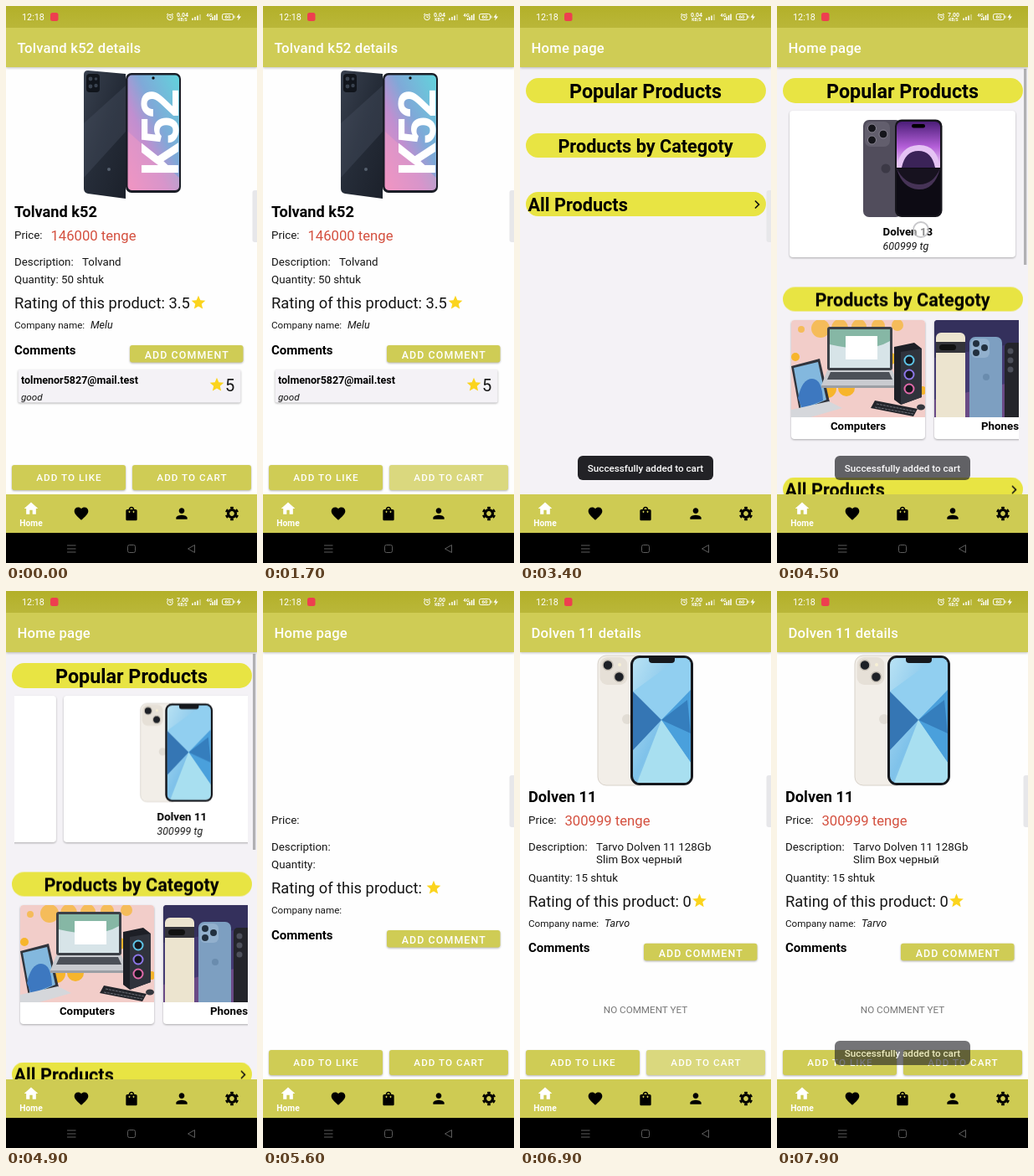
Recreate the animation shown at these times as an HTML page. Size 300 px wide and 665 px high, loop 8 s.

```html
<!DOCTYPE html>
<html lang="en">
<head>
<meta charset="utf-8">
<title>Shop app</title>
<style>
html, body { margin: 0; width: 100%; height: 100%; overflow: hidden; background: #fff; }
svg { display: block; width: 100%; height: 100%; }
text { font-family: Roboto, "Noto Sans", sans-serif; font-size: 13.33px; fill: #161616; white-space: pre; }
.title { font-size: 16.67px; font-weight: 500; letter-spacing: .2px; fill: #fff; }
.name { font-size: 18.2px; font-weight: 700; fill: #000; }
.cost { font-size: 16.67px; fill: #d4503f; }
.rate { font-size: 18.33px; }
.small { font-size: 11.67px; }
.ital { font-size: 12.5px; font-style: italic; }
.head { font-size: 15px; font-weight: 700; fill: #000; }
.btn { font-size: 11.67px; font-weight: 500; letter-spacing: 1.04px; fill: #fff; text-anchor: middle; }
.wide { font-size: 12.4px; letter-spacing: 1.1px; }
.bold { font-weight: 700; fill: #000; }
.pill { font-size: 21.67px; font-weight: 700; fill: #000; }
.mid { text-anchor: middle; }
.raised { filter: drop-shadow(0 1px 1px rgba(0,0,0,.3)); }
.tiny { font-size: 6px; font-weight: 700; fill: #fff; text-anchor: middle; }
</style>
</head>
<body>
<svg viewBox="0 0 300 665" preserveAspectRatio="none">
<defs>
  <linearGradient id="bar" x2="0" y2="1"><stop stop-color="#b3b029"/><stop offset="1" stop-color="#bab739"/></linearGradient>
  <linearGradient id="dark" x2="1" y2="1"><stop stop-color="#38404e"/><stop offset=".5" stop-color="#252c38"/><stop offset="1" stop-color="#1c212b"/></linearGradient>
  <linearGradient id="candy" x1="1" y1="0" x2="0" y2="1"><stop stop-color="#62d3dc"/><stop offset=".4" stop-color="#7fa9d8"/><stop offset=".62" stop-color="#c08fd0"/><stop offset="1" stop-color="#ef8fc0"/></linearGradient>
  <linearGradient id="sky" x2="1" y2="1"><stop stop-color="#b9e2f4"/><stop offset=".5" stop-color="#7fc2ea"/><stop offset="1" stop-color="#c9ecf0"/></linearGradient>
  <linearGradient id="dusk" x2="0" y2="1"><stop stop-color="#4b1e78"/><stop offset=".55" stop-color="#b45fd8"/><stop offset="1" stop-color="#f1d9f8"/></linearGradient>
  <clipPath id="body"><rect y="73" width="300" height="510"/></clipPath>
  <clipPath id="strip"><rect x="10" y="120" width="279" height="420"/></clipPath>
  <clipPath id="pic1"><path d="M17 491V379q0-4 4-4H173q4 0 4 4V491z"/></clipPath>
  <clipPath id="pic2"><path d="M188 491V379q0-4 4-4H344q4 0 4 4V491z"/></clipPath>
  <clipPath id="lightScreen"><rect x="135" y="80" width="69" height="149" rx="8"/></clipPath>
  <clipPath id="duskScreen"><rect x="143" y="138" width="52" height="112" rx="6"/></clipPath>
  <path id="star" fill="#fbd41d" d="M12 17.27L18.18 21l-1.64-7.03L22 9.24l-7.19-.61L12 2 9.19 8.63 2 9.24l5.46 4.73L5.82 21z"/>

  <g id="darkPhone">
    <path d="M98 77L143 81V230L98 224Q93 223 93 218V82Q93 77 98 77z" fill="url(#dark)"/>
    <path d="M93 140L143 95V150L93 205z" fill="#4a5566" opacity=".35"/>
    <rect x="96" y="81" width="16" height="22" rx="4" fill="#11151c"/>
    <g fill="#39424f"><circle cx="101" cy="87" r="2.4"/><circle cx="101" cy="96" r="2.4"/><circle cx="107.500" cy="87" r="1.800"/><circle cx="107.500" cy="95" r="2.200"/></g>
    <circle cx="123" cy="195" r="2" fill="#56606e"/>
    <rect x="143" y="80" width="66" height="143" rx="7" fill="#1a1d26"/>
    <rect x="145.500" y="82.500" width="61.500" height="137.500" rx="5" fill="url(#candy)"/>
    <path d="M146 150L207 205V215q0 5-5 5H151q-5 0-5-5z" fill="#f49cc4" opacity=".45"/>
    <circle cx="176" cy="86" r="1.700" fill="#111"/>
    <text transform="translate(206 203) rotate(-90)" style="font-size:62px;font-weight:700;fill:#fff;letter-spacing:-3px">K52</text>
  </g>

  <g id="lightPhone">
    <rect x="93" y="77" width="60" height="155" rx="10" fill="#f2eee8" stroke="#d8d2ca"/>
    <rect x="95.500" y="79" width="33" height="33" rx="9" fill="#e6e0d7"/>
    <g fill="#1d2026" stroke="#c5beb4" stroke-width="1.500"><circle cx="105" cy="88.500" r="6"/><circle cx="118.500" cy="102.500" r="6"/></g>
    <circle cx="119" cy="88" r="2" fill="#f8f0d5"/>
    <circle cx="128" cy="153" r="6" fill="#e2ddd5"/>
    <rect x="132" y="77" width="75" height="155" rx="11" fill="#16181d"/>
    <g clip-path="url(#lightScreen)">
      <rect x="135" y="80" width="69" height="149" fill="url(#sky)"/>
      <path d="M135 120L169 154 204 120V80H190z" fill="#91cff0"/>
      <path d="M135 120L169 154 135 190z" fill="#3576b4"/>
      <path d="M169 154L204 118V205z" fill="#4aa0dc"/>
      <path d="M169 154L204 205V229H140z" fill="#a8dff0"/>
      <path d="M169 154L200 130 204 170z" fill="#2968a8" opacity=".6"/>
    </g>
    <path d="M154 79H185V82q0 4-4 4H158q-4 0-4-4z" fill="#16181d"/>
  </g>

  <g id="duskPhone">
    <rect x="103" y="136" width="46" height="116" rx="7" fill="#514d5c"/>
    <rect x="105" y="138" width="30" height="30" rx="7" fill="#625e6d"/>
    <g fill="#15151b" stroke="#8a8694"><circle cx="113.500" cy="146" r="5"/><circle cx="113.500" cy="160" r="5"/><circle cx="127" cy="153" r="5"/></g>
    <circle cx="130" cy="194" r="5.500" fill="#3c3946"/>
    <rect x="141" y="135.500" width="56.500" height="116.500" rx="8" fill="#15141b"/>
    <g clip-path="url(#duskScreen)">
      <rect x="143" y="138" width="52" height="112" fill="#0d0b14"/>
      <path d="M143 138H195V193H143z" fill="url(#dusk)"/>
      <path d="M143 193Q147 167 169 166T195 193z" fill="#e5c3f4"/>
      <path d="M149 193Q153 173 169 173T189 193z" fill="#3b2358"/>
      <path d="M143 194Q150 218 169 219T195 194z" fill="#463356"/>
      <path d="M143 194Q152 212 169 213T195 194z" fill="#17121f"/>
    </g>
    <rect x="161" y="141" width="16" height="4.500" rx="2.200" fill="#000"/>
  </g>
</defs>

<g id="first"></g>

<g id="home" clip-path="url(#body)">
  <rect y="73" width="300" height="510" fill="#f4f2f6"/>
  <rect x="7" y="86" width="287" height="30" rx="15" fill="#e8e443"/>
  <text x="150" y="110" class="pill mid" style="font-size:23.33px">Popular Products</text>
  <g id="lists" clip-path="url(#strip)">
    <g id="slides">
      <g class="slide"></g>
      <g class="slide" transform="translate(279)"></g>
    </g>
    <g class="raised">
      <rect x="17" y="375" width="160" height="142" rx="4" fill="#fff"/>
      <rect x="188" y="375" width="160" height="142" rx="4" fill="#fff"/>
    </g>
    <g id="pictures">
      <g clip-path="url(#pic1)">
        <rect x="17" y="375" width="160" height="116" fill="#f2cdc9"/>
        <g id="dots" fill="#f7b52c"></g>
        <path d="M17 430L51 421 63 473 28 489z" fill="#30343c"/>
        <path d="M20 432L49 425 59 470 29 483z" fill="#83b8de"/>
        <path d="M25 468Q30 445 42 445T55 471L30 481z" fill="#3d78c0"/>
        <path d="M17 482L62 472 78 480 40 491H17z" fill="#d5d7db"/>
        <rect x="60" y="383" width="78" height="52" rx="3" fill="#3c4047"/>
        <rect x="63" y="386" width="72" height="46" fill="#d7e4e8"/>
        <path d="M63 386H135V400Q110 415 63 404z" fill="#86b7a5"/>
        <rect x="82" y="394" width="38" height="28" fill="#fff"/>
        <path d="M60 435H138L145 453H53z" fill="#c9cbd0"/>
        <path d="M64 437H134L138 446H60z" fill="#4c5058"/>
        <path d="M53 453H145V456H53z" fill="#9c9fa5"/>
        <path d="M140 407L164 402 173 409V467L148 476 140 470z" fill="#1d1f26"/>
        <path d="M148 413L173 409V467L148 476z" fill="#30333c"/>
        <g fill="#15161c" stroke-width="2"><circle cx="158" cy="423" r="5.500" stroke="#5dc5e8"/><circle cx="158" cy="440" r="5.500" stroke="#8d76e8"/><circle cx="158" cy="457" r="5.500" stroke="#e069a9"/></g>
        <path d="M117 471L168 481 163 490 112 480z" fill="#23252b"/>
        <path d="M119 475L165 484M117 479L163 487" stroke="#6d7078" stroke-dasharray="3 1"/>
        <ellipse cx="172" cy="479" rx="5" ry="3.500" fill="#34373e"/>
      </g>
      <g clip-path="url(#pic2)">
        <rect x="188" y="375" width="160" height="116" fill="#443a72"/>
        <path d="M188 375H300V400L188 420z" fill="#34305c"/>
        <path d="M188 470L300 445V491H188z" fill="#6a4a86"/>
        <rect x="190" y="390" width="35" height="110" rx="6" fill="#ece4cf"/>
        <rect x="190" y="401" width="35" height="13" fill="#34343a"/>
        <rect x="194" y="404" width="20" height="7" rx="3.500" fill="#111"/>
        <rect x="230" y="395" width="39" height="105" rx="7" fill="#7d9fc1"/>
        <rect x="232" y="397" width="22" height="23" rx="6" fill="#92b0cd"/>
        <g fill="#22303f"><circle cx="238" cy="403" r="4"/><circle cx="238" cy="414" r="4"/><circle cx="248" cy="408" r="4"/></g>
        <circle cx="250" cy="443" r="4" fill="#6a8cae"/>
        <rect x="272" y="402" width="36" height="100" rx="5" fill="#24252b"/>
        <g fill="#4d505b"><circle cx="279" cy="412" r="3.500"/><circle cx="279" cy="423" r="3.500"/><circle cx="279" cy="434" r="3.500"/></g>
      </g>
    </g>
    <text x="97" y="506" class="bold mid">Computers</text>
    <text x="244" y="506" class="bold">Phones</text>
  </g>
  <g id="category">
    <rect x="7" y="152" width="287" height="29" rx="14.500" fill="#e8e443"/>
    <text x="150" y="174.500" class="pill mid">Products by Categoty</text>
  </g>
  <g id="all">
    <rect x="7" y="222" width="287" height="29" rx="14.500" fill="#e8e443"/>
    <text x="9.500" y="245" class="pill">All Products</text>
    <path d="M281 232.500L285.500 237 281 241.500" fill="none" stroke="#111" stroke-width="1.700"/>
  </g>
</g>

<g id="second"></g>

<rect id="handle" x="294.500" y="220" width="8" height="62" rx="3" fill="#e7e7ea"/>
<rect id="scroll" x="295" y="75" width="3.300" height="234" fill="#b1b0b3"/>

<g>
  <rect y="26" width="300" height="47" fill="#cfcc55" style="filter:drop-shadow(0 1px 1.500px rgba(0,0,0,.25))"/>
  <rect width="300" height="26" fill="url(#bar)"/>
  <text class="title" id="t1" x="13.500" y="56">Tolvand k52 details</text>
  <text class="title" id="t2" x="13.500" y="56">Home page</text>
  <text class="title" id="t3" x="13.500" y="56">Dolven 11 details</text>
  <text x="19" y="17" style="font-size:10.8px;fill:#fff">12:18</text>
  <rect x="53" y="8" width="9.500" height="10" rx="2.500" fill="#ee3f4f"/>
  <g fill="none" stroke="#fff">
    <circle cx="196" cy="13.500" r="3.300"/><path d="M196 11.500V13.700H197.500M192 10.500L194 9M200 10.500L198 9"/>
    <rect x="258.500" y="9.500" width="13" height="7" rx="2"/><path d="M273 11.500V14.500"/>
  </g>
  <text class="tiny" id="slow" x="211" y="12.500" style="font-size:7px">0.04</text>
  <text class="tiny" id="fast" x="211" y="12.500" style="font-size:7px">7.00</text>
  <text class="tiny" x="211" y="18" style="font-size:5px">KB/S</text>
  <path d="M223 17V14.500M226 17V13M229 17V11.500M244.500 17V14.500M247 17V13M249.500 17V11M252 17V9.500" stroke="#fff" stroke-width="1.500"/>
  <path d="M232 17V10" stroke="#fff" stroke-opacity=".45" stroke-width="1.500"/>
  <text class="tiny" x="243" y="13">4G</text>
  <text class="tiny" x="265" y="15.200">60</text>
  <path d="M279 9L275.500 13.700H278L277 17.500 281 12.500H278.400z" fill="#fff"/>
</g>

<g>
  <rect y="583" width="300" height="46" fill="#cecb53"/>
  <path transform="translate(20 590) scale(.833)" fill="#fff" d="M10 20v-6h4v6h5v-8h3L12 3 2 12h3v8z"/>
  <text x="30" y="621" class="mid" style="font-size:10.2px;font-weight:700;fill:#fff">Home</text>
  <path transform="translate(80 596) scale(.833)" d="M12 21.35l-1.45-1.32C5.4 15.36 2 12.28 2 8.5 2 5.42 4.42 3 7.5 3c1.74 0 3.41.81 4.5 2.09C13.09 3.81 14.76 3 16.5 3 19.58 3 22 5.42 22 8.5c0 3.78-3.4 6.86-8.55 11.54z"/>
  <path transform="translate(140 596) scale(.833)" d="M18 6h-2c0-2.210-1.790-4-4-4S8 3.790 8 6H6c-1.100 0-2 .9-2 2v12c0 1.100.9 2 2 2h12c1.100 0 2-.9 2-2V8c0-1.100-.9-2-2-2zm-6-2c1.100 0 2 .9 2 2h-4c0-1.100.9-2 2-2zm-2 6c0 .55-.45 1-1 1s-1-.45-1-1V8h2zm6 0c0 .55-.45 1-1 1s-1-.45-1-1V8h2z"/>
  <path transform="translate(200 596) scale(.833)" d="M12 12c2.210 0 4-1.790 4-4s-1.790-4-4-4-4 1.790-4 4 1.790 4 4 4zm0 2c-2.670 0-8 1.340-8 4v2h16v-2c0-2.660-5.330-4-8-4z"/>
  <g transform="translate(270 606) scale(.833)" fill="none" stroke="#000">
    <circle r="5.400" stroke-width="3.800"/>
    <circle r="8.300" stroke-width="3" pathLength="12" stroke-dasharray="1 1" stroke-dashoffset="-.5"/>
  </g>
  <rect y="629" width="300" height="36" fill="#000"/>
  <g fill="none" stroke="#5c5c5c"><path d="M73 644H83.500M73 648H83.500M73 652H83.500"/><rect x="145.500" y="643.500" width="9" height="9" rx="2"/><path d="M225.500 643.500V652.500L217.500 648z"/></g>
</g>

<g id="toast">
  <rect x="69" y="537" width="162" height="29" rx="6" fill="#222226"/>
  <text x="150" y="556" class="small mid" style="font-weight:500;fill:#fff">Successfully added to cart</text>
</g>
<circle id="touch" cx="172" cy="267" r="9" fill="#fff" fill-opacity=".55" stroke="#b9b9bd" stroke-opacity=".8" stroke-width="2"/>
</svg>

<script>
const LOOP = 8000;
const $ = id => document.getElementById(id);

const button = (x, y, w, h, label, base, cls = '') =>
  `<rect class="raised" x="${x}" y="${y}" width="${w}" height="${h}" rx="3" fill="#cfcc55"/>
   <text class="btn ${cls}" x="${x + w / 2 + .5}" y="${base}">${label}</text>`;

const star = (x, y) => `<use href="#star" transform="translate(${x} ${y}) scale(.833)"/>`;

// Product facts; a second description line pushes the rest down
function facts(p) {
  const d = p.more ? 15.7 : 0;
  return `<rect y="73" width="300" height="470" fill="#fefefe"/>
    ${p.art ? `<use href="#${p.art}"/>` : ''}
    <text class="name" x="10" y="252">${p.name}</text>
    <text x="10" y="278">Price:</text><text class="cost" x="53.500" y="279.500">${p.cost}</text>
    <text x="10" y="309.500">Description:</text><text x="91" y="309.500">${p.about}</text>
    <text x="91" y="325.300">${p.more}</text>
    <g transform="translate(0 ${d})">
      <text x="10" y="331">Quantity: ${p.count}</text>
      <text class="rate" x="10" y="361">Rating of this product: ${p.rating}</text>
      ${star(p.starX, 344)}
      <text class="small" x="10" y="385">Company name:</text><text class="ital" x="101" y="385">${p.maker}</text>
      <text class="head" x="10" y="415.500">Comments</text>
      ${button(148, 405, 135.500, 20.500, 'ADD COMMENT', 421, 'wide')}
    </g>${p.notes}`;
}

const page = inner => `<rect y="73" width="300" height="510" fill="#fefefe"/>${inner}
  ${button(7, 548, 136, 30, 'ADD TO LIKE', 567)}${button(151, 548, 142, 30, 'ADD TO CART', 567)}
  <rect class="press" x="151" y="548" width="142" height="30" rx="3" fill="#fff"/>`;

const blank = { name: '', cost: '', about: '', more: '', count: '', rating: '', starX: 194, maker: '', notes: '' };

$('first').innerHTML = page(facts({
  art: 'darkPhone', name: 'Tolvand k52', cost: '146000 tenge', about: 'Tolvand', more: '',
  count: '50 shtuk', rating: '3.5', starX: 220, maker: 'Melu',
  notes: `<rect class="raised" x="14.500" y="434" width="266" height="39.500" rx="2" fill="#f4f2f6"/>
    <text class="bold" x="18" y="451" style="font-size:12.5px">tolmenor5827@mail.test</text>
    <text class="small" x="18" y="470.500" style="font-style:italic">good</text>
    ${star(242, 442)}<text x="262" y="460" style="font-size:20px">5</text>`
}));

$('second').innerHTML = page(facts(blank) + `<g id="filled">${facts({
  art: 'lightPhone', name: 'Dolven 11', cost: '300999 tenge', about: 'Tarvo Dolven 11 128Gb', more: 'Slim Box черный',
  count: '15 shtuk', rating: '0', starX: 204.500, maker: 'Tarvo',
  notes: '<text class="small mid" x="150" y="504" style="fill:#777">NO COMMENT YET</text>'
})}</g>`);

const slide = (art, name, cost) =>
  `<rect class="raised" x="15" y="125" width="270" height="175" rx="4" fill="#fff"/>
   <g class="art">${art}</g>
   <text class="bold" x="126.500" y="274">${name}</text><text class="ital" x="126.500" y="291">${cost}</text>`;
const [s1, s2] = document.querySelectorAll('.slide');
s1.innerHTML = slide('<use href="#duskPhone"/>', 'Dolven 13', '600999 tg');
s2.innerHTML = slide('<use href="#lightPhone" transform="translate(36.500 76) scale(.757)"/>', 'Dolven 11', '300999 tg');

$('dots').innerHTML = Array.from({ length: 16 }, (_, i) =>
  `<circle cx="${17 + (i * 61 + 12) % 160}" cy="${377 + (i * 37 + 9) % 112}" r="${4 + i * 5 % 8}" opacity="${i % 3 ? 1 : .7}"/>`).join('');

// steps: [ms, value]; hard keeps each value until the next step
function play(el, prop, steps, hard) {
  const all = [[0, steps[0][1]], ...steps, [LOOP, steps.at(-1)[1]]];
  el.animate(all.map(([t, v, easing = 'linear']) =>
    ({ offset: t / LOOP, [prop]: v, easing: hard ? 'steps(1, end)' : easing })),
    { duration: LOOP, iterations: Infinity });
}
const fade = (el, ...steps) => play(el, 'opacity', steps);
const show = (el, from, to) => play(el, 'opacity', [[0, from ? 0 : 1], [from, 1], [to, to < LOOP ? 0 : 1]], true);
const move = (x, y) => `translate(${x}px, ${y}px)`;

show($('t1'), 0, 3200);
show($('t2'), 3200, 5900);
show($('t3'), 5900, LOOP);
show($('slow'), 0, 3600);
show($('fast'), 3600, LOOP);
show($('first'), 0, 3400);
fade($('home'), [3080, 0], [3350, 1], [5620, 1], [5621, 0]);
fade($('second'), [5380, 0], [5600, 1]);
show($('filled'), 5900, LOOP);

show($('lists'), 3600, 5700);
play($('category'), 'transform', [[0, move(0, 0)], [3600, move(0, 183.5)]], true);
play($('all'), 'transform', [[0, move(0, 0)], [3600, move(0, 340.5)]], true);
for (const el of [...document.querySelectorAll('.art'), $('pictures')]) fade(el, [3750, 0], [4200, 1]);
play($('slides'), 'transform', [
  [4500, move(0, 0), 'ease-in'], [4650, move(-75, 0)], [4750, move(-150, 0)],
  [4900, move(-225, 0), 'ease-out'], [5250, move(-262, 0)]
]);

fade($('scroll'), [3599, 0], [3600, 1], [5000, 1], [5300, 0]);
play($('handle'), 'opacity', [[0, 1], [3600, 0], [5400, 1]], true);
fade($('touch'), [4420, 0], [4450, 1], [4720, 1], [4760, 0]);
play($('touch'), 'transform', [[4500, move(0, 0), 'ease-in'], [4650, move(-75, 0)], [4740, move(-140, 0)]]);

const [press1, press2] = document.querySelectorAll('.press');
fade(press1, [1480, 0], [1620, .24], [1740, .24], [1930, 0]);
fade(press2, [6780, 0], [6900, .24], [6980, .24], [7130, 0]);
fade($('toast'), [2180, 0], [2480, 1], [4400, 1], [4500, .7], [4700, 0], [7740, 0], [7900, .62], [7999, 1], [LOOP, 1]);
</script>
</body>
</html>
```
